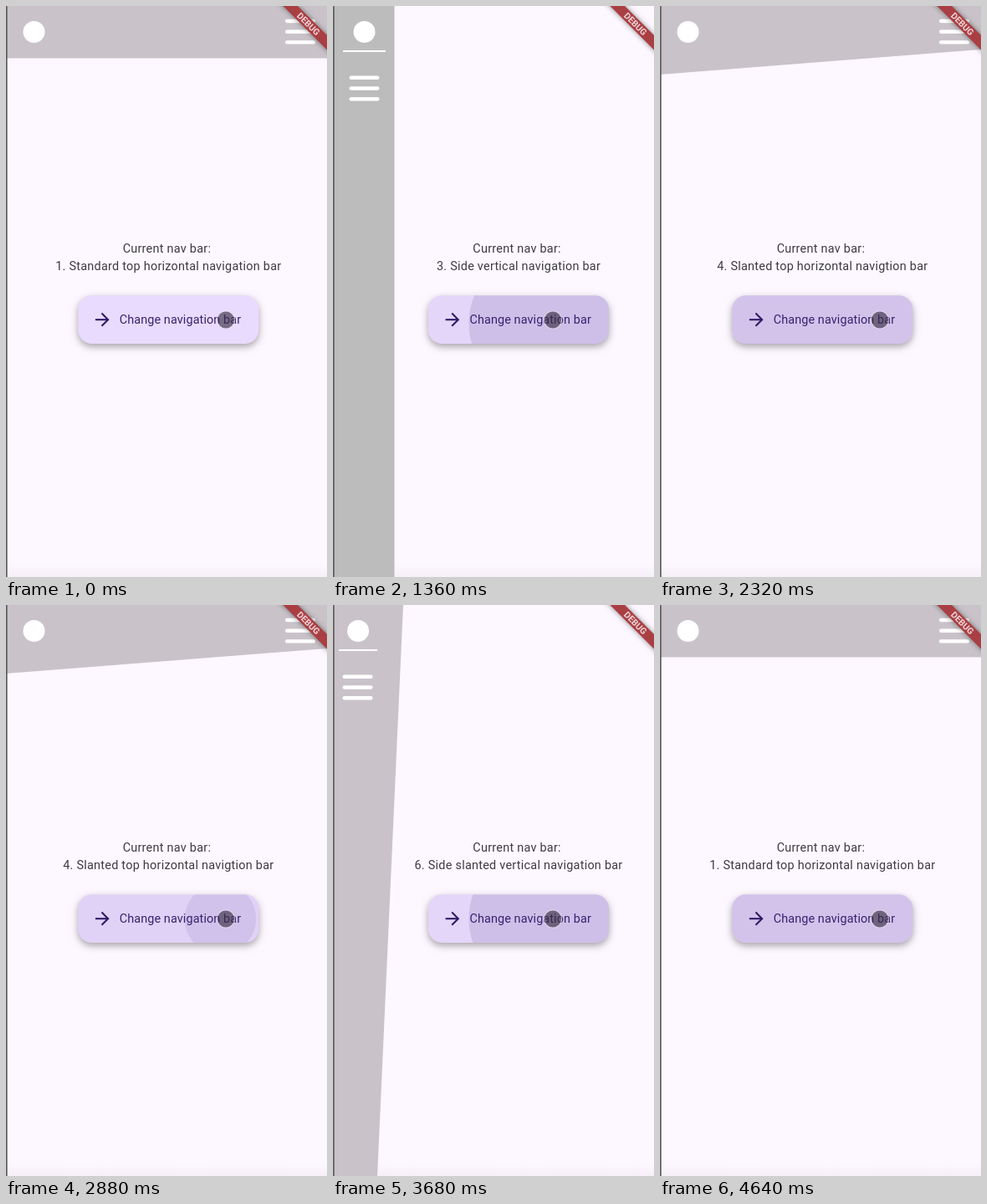
Recreate the animation shown at these times as an HTML page with a canvas. Size 384 by 683 pixels, loop 4720 ms.

```html
<!DOCTYPE html>
<html lang="en">
<head>
<meta charset="utf-8">
<title>Navigation bar demo</title>
<style>
  html, body { margin: 0; width: 100%; height: 100%; overflow: hidden; background: #fdf7ff; }
  canvas { display: block; width: 384px; height: 683px; }
</style>
</head>
<body>
<canvas id="stage" width="384" height="683"></canvas>
<script>
const ctx = document.getElementById('stage').getContext('2d');
const W = 384, H = 683, LOOP = 4720, STEP = 80;
const UNIT = 1.03;
const BUTTON = { w: 216, h: 57.7, r: 16.5 };
const TOUCH = { x: 263, y: 375.5 };
const GREY = '#c9c3c9';
const HEADING = 'Current nav bar: ';

// Each bar: outline, logo centre, menu icon centre, optional divider, caption lines.
const BARS = [
  { shape: [[0, 0], [W, 0], [W, 62.5], [0, 62.5]], logo: [33.5, 31], menu: [352, 30.7],
    lines: [HEADING, '1. Standard top horizontal navigation bar'] },
  { shape: [[0, 621], [W, 621], [W, H], [0, H]], logo: [33.5, 653], menu: [352, 652.7],
    lines: [HEADING + '2. Bottom horizontal navigation bar'] },
  { shape: [[0, 0], [73.5, 0], [73.5, H], [0, H]], color: '#bcbcbc',
    logo: [37.5, 31], menu: [37.5, 98.5], divider: [12, 63], cx: 222,
    lines: [HEADING, '3. Side vertical navigation bar'] },
  { shape: [[0, 0], [W, 0], [W, 52], [0, 82]], logo: [33.5, 31], menu: [352, 30.7],
    lines: [HEADING, '4. Slanted top horizontal navigtion bar'] },
  { shape: [[0, 601], [W, 631], [W, H], [0, H]], logo: [33.5, 653], menu: [352, 652.7],
    lines: [HEADING, '5. Slanted bottom horizontal navigation bar'] },
  { shape: [[0, 0], [84, 0], [53, H], [0, H]],
    logo: [30, 31], menu: [29.5, 98.5], divider: [7, 53], cx: 222,
    lines: [HEADING, '6. Side slanted vertical navigation bar'] }
];

const TAPS = [[390, 490], [1194, 1304], [1950, 2110], [2780, 2920], [3514, 3624], [4340, 4450]]
  .map(([down, up]) => ({ down, up }));

const clamp = v => Math.min(1, Math.max(0, v));
const mix = (a, b, p) => a + (b - a) * p;

// cubic-bezier(.25, .1, .25, 1)
function ease(x) {
  const bez = (a, b, s) => 3 * a * s * (1 - s) ** 2 + 3 * b * s * s * (1 - s) + s ** 3;
  let lo = 0, hi = 1;
  for (let i = 0; i < 24; i++) {
    const mid = (lo + hi) / 2;
    if (bez(0.25, 0.25, mid) < x) lo = mid; else hi = mid;
  }
  return bez(0.1, 1, hi);
}

function layout(bar) {
  const line = 20 * UNIT, gap = 25.4, text = bar.lines.length * line;
  const cx = bar.cx || 194.3;
  const top = 341.9 - (text + gap + BUTTON.h) / 2;
  return { cx, top, line, x: cx - BUTTON.w / 2, y: top + text + gap };
}

function label(text, x, y, align, color, spacing) {
  ctx.font = `${14 * UNIT}px Roboto, sans-serif`;
  ctx.letterSpacing = `${spacing * UNIT}px`;
  ctx.textAlign = align;
  ctx.textBaseline = 'alphabetic';
  ctx.fillStyle = color;
  ctx.fillText(text, x, y);
}

function stroke(points, width, cap = 'butt') {
  ctx.lineWidth = width;
  ctx.lineCap = cap;
  ctx.beginPath();
  points.forEach(([x, y]) => ctx.lineTo(x, y));
  ctx.stroke();
}

function disc(x, y, r) {
  ctx.beginPath();
  ctx.arc(x, y, r, 0, Math.PI * 2);
  ctx.fill();
}

function drawBar(bar) {
  ctx.fillStyle = bar.color || GREY;
  ctx.beginPath();
  bar.shape.forEach(([x, y]) => ctx.lineTo(x, y));
  ctx.fill();
  ctx.fillStyle = ctx.strokeStyle = '#fff';
  disc(...bar.logo, 13);
  const [mx, my] = bar.menu;
  for (const dy of [-12.7, 0, 12.7]) {
    stroke([[mx - 15.8, my + dy], [mx + 15.8, my + dy]], 4.4, 'round');
  }
  if (bar.divider) stroke(bar.divider.map(x => [x, 54]), 2);
}

function drawInk(t, tap, origin) {
  const since = t - tap.up;
  const press = clamp((Math.min(t, tap.up) - tap.down) / 200);
  const highlight = 0.09 * clamp(press - Math.max(0, since) / 200);
  ctx.fillStyle = `rgba(33,0,93,${highlight})`;
  ctx.fillRect(0, 0, BUTTON.w, BUTTON.h);

  const growth = (Math.min(t, tap.up) - tap.down) / 1000 + Math.max(0, since) / 225;
  const p = ease(clamp(growth));
  const full = Math.hypot(BUTTON.w, BUTTON.h) / 2 + 5;
  const alpha = 0.11 * clamp((t - tap.down) / 150) * (1 - clamp((since - 225) / 150));
  ctx.fillStyle = `rgba(33,0,93,${alpha})`;
  disc(mix(TOUCH.x - origin.x, BUTTON.w / 2, p),
       mix(TOUCH.y - origin.y, BUTTON.h / 2, p),
       full * mix(0.3, 1, p));
}

function drawButton(t, place) {
  ctx.save();
  ctx.translate(place.x, place.y);
  ctx.beginPath();
  ctx.roundRect(0, 0, BUTTON.w, BUTTON.h, BUTTON.r);
  ctx.save();
  ctx.shadowColor = 'rgba(0,0,0,.34)';
  ctx.shadowBlur = 8;
  ctx.shadowOffsetY = 3.5;
  ctx.fillStyle = '#e9dbfd';
  ctx.fill();
  ctx.restore();

  ctx.save();
  ctx.clip();
  TAPS.forEach((tap, i) => {
    if (t >= tap.down && t < tap.up + 375) drawInk(t, tap, layout(BARS[i]));
  });
  ctx.restore();

  const mid = BUTTON.h / 2;
  ctx.strokeStyle = '#331a66';
  stroke([[20.6, mid], [36, mid]], 2.1);
  stroke([[28.2, mid - 7.6], [35.8, mid], [28.2, mid + 7.6]], 2.1);
  label('Change navigation bar', 48 * UNIT, mid + 5.2, 'left', '#3a2170', 0.1);
  ctx.restore();
}

function drawBanner() {
  ctx.save();
  ctx.translate(386.5, -3.3);
  ctx.rotate(Math.PI / 4);
  ctx.scale(UNIT, UNIT);
  ctx.save();
  ctx.shadowColor = 'rgba(0,0,0,.45)';
  ctx.shadowBlur = 6;
  ctx.fillStyle = '#aa3f43';
  ctx.fillRect(-48, 28, 96, 12);
  ctx.restore();
  ctx.font = '700 10.2px Roboto, sans-serif';
  ctx.letterSpacing = '0px';
  ctx.textAlign = 'center';
  ctx.textBaseline = 'middle';
  ctx.fillStyle = '#eed6d9';
  ctx.fillText('DEBUG', 0, 34.5);
  ctx.restore();
}

function drawTouch() {
  ctx.fillStyle = 'rgba(55,45,65,.64)';
  disc(TOUCH.x, TOUCH.y, 10.3);
  ctx.strokeStyle = 'rgba(235,228,240,.5)';
  ctx.lineWidth = 1.4;
  ctx.beginPath();
  ctx.arc(TOUCH.x, TOUCH.y, 10.6, 0, Math.PI * 2);
  ctx.stroke();
}

function draw(t) {
  const bar = BARS[TAPS.filter(tap => t >= tap.up).length % BARS.length];
  const place = layout(bar);

  ctx.fillStyle = '#fdf7ff';
  ctx.fillRect(0, 0, W, H);
  const foot = ctx.createLinearGradient(0, 668, 0, H);
  foot.addColorStop(0, 'rgba(246,239,248,0)');
  foot.addColorStop(1, 'rgba(246,239,248,1)');
  ctx.fillStyle = foot;
  ctx.fillRect(0, 668, W, 15);

  drawBar(bar);
  bar.lines.forEach((text, i) =>
    label(text, place.cx, place.top + place.line * (i + 0.5) + 5, 'center', '#3d3a40', 0.25));
  drawButton(t, place);
  drawBanner();
  drawTouch();
  ctx.fillStyle = '#5a565c';
  ctx.fillRect(0, 0, 1.6, H);
}

const start = performance.now();
function tick() {
  const t = (performance.now() - start) % LOOP;
  draw(Math.floor(t / STEP) * STEP);
  requestAnimationFrame(tick);
}
tick();
</script>
</body>
</html>
```
